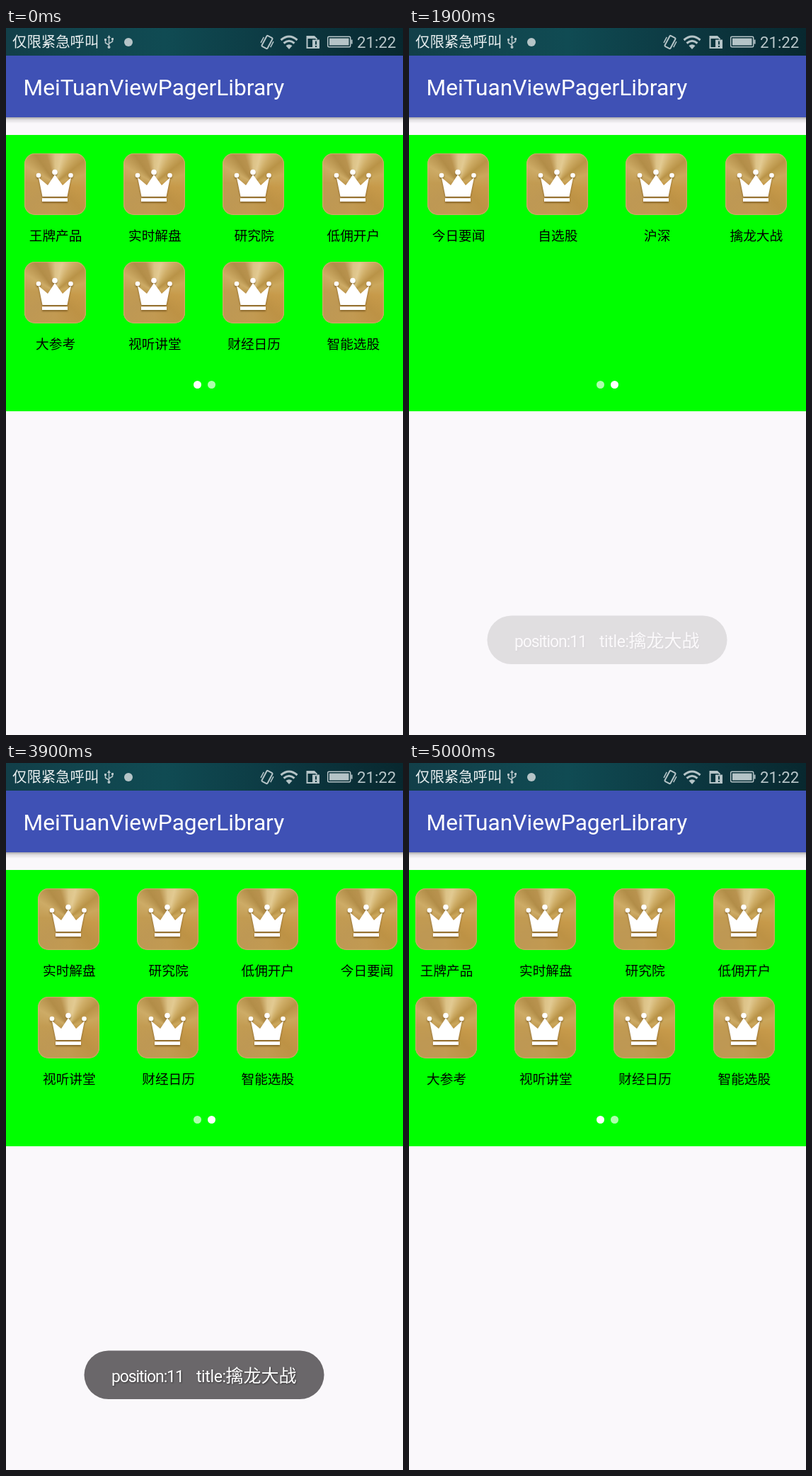
Recreate the animation shown at these times as an HTML page. Size 561 by 998 pixels, loop 5100 ms.

```html
<!DOCTYPE html>
<html lang="zh-CN">
<head>
<meta charset="utf-8">
<style>
html, body { margin: 0; width: 100%; height: 100%; overflow: hidden; background: #faf8fb; }
#stage { position: relative; width: 561px; height: 998px; overflow: hidden; }
#pager { position: absolute; top: 151px; width: 561px; height: 390px; background: #0f0; overflow: hidden; }
#track { position: absolute; inset: 0; will-change: transform; }
.item { position: absolute; width: 140.25px; height: 150px; text-align: center;
  font: 500 18.7px/28px "Noto Sans CJK SC", "Noto Sans CJK", sans-serif; color: #000; white-space: nowrap; }
.icon { position: relative; width: 87px; height: 87px; margin: 0 auto 14px; left: -.7px; border-radius: 15px;
  box-shadow: inset 0 0 1.5px .5px #dcbd7c;
  background: conic-gradient(from 0deg at 50% 48%, #dcc287, #e2ca92 14deg, #cfae68 32deg, #b99347 52deg, #cba75c 74deg,
    #c79a4a 100deg, #bd9245 135deg, #c29a52 180deg, #be9854 230deg, #c29b52 270deg, #cdab66 300deg,
    #b28d48 325deg, #b9934f 343deg, #dcc287); }
.icon svg { width: 87px; height: 87px; display: block; filter: drop-shadow(0 2px 1px #6b4a12a0); }
#overlay { position: absolute; inset: 0; }
.roboto { font-family: Roboto, sans-serif; }
.cjk { font-family: "Noto Sans CJK SC", "Noto Sans CJK", sans-serif; }
#toast text { filter: drop-shadow(1px 1px 1px #0008); }
</style>
</head>
<body>
<div id="stage">
  <div id="pager"><div id="track"></div></div>
  <svg id="overlay" width="561" height="998" viewBox="0 0 561 998">
    <defs>
      <linearGradient id="status">
        <stop stop-color="#123f49"/><stop offset=".4" stop-color="#104b53"/>
        <stop offset=".7" stop-color="#0c3841"/><stop offset="1" stop-color="#08282f"/>
      </linearGradient>
      <linearGradient id="shade" x2="0" y2="1">
        <stop stop-opacity=".32"/><stop offset=".4" stop-opacity=".1"/><stop offset="1" stop-opacity="0"/>
      </linearGradient>
    </defs>
    <rect width="561" height="40" fill="url(#status)"/>
    <rect y="39" width="561" height="87" fill="#3f51b5"/>
    <rect y="126" width="561" height="9" fill="url(#shade)"/>
    <text class="roboto" x="24.5" y="95" font-size="31.7" fill="#fff">MeiTuanViewPagerLibrary</text>
    <text class="cjk" x="9" y="27" font-size="20.4" fill="#e9eff0">仅限紧急呼叫</text>
    <text class="roboto" x="496" y="28" font-size="22.2" fill="#b9c7ca">21:22</text>

    <g fill="none" stroke="#b5c4c7" stroke-width="1.5">
      <!-- usb -->
      <path d="M145.5 13V27M145.5 24L140.5 21V17M145.5 22L150.5 19V16"/>
      <path d="M145.5 10l2.5 4h-5zM139 15h3v3h-3zM149 14h3v3h-3z" fill="#b5c4c7" stroke="none"/>
      <circle cx="145.5" cy="27" r="2" fill="#b5c4c7" stroke="none"/>
      <circle cx="173" cy="20" r="6" fill="#b5c4c7" stroke="none"/>
      <!-- vibrate -->
      <g transform="rotate(28 369 20)">
        <rect x="364.5" y="11.5" width="9" height="17" rx="1.5" stroke-width="2"/>
        <path d="M361.5 16V25M376.5 15V24"/>
      </g>
      <!-- wifi -->
      <path d="M388.5 17Q400 7 411.5 17M392.5 21.5Q400 15 407.5 21.5" stroke-width="3"/>
      <path d="M395.5 25Q400 21.5 404.5 25L400 30z" fill="#b5c4c7" stroke="none"/>
      <!-- sim -->
      <path d="M434 28H425.5V12H435.5L439.5 16" stroke-width="2"/>
      <path d="M425 11h10l3 4h-13zM433 16.5h10v12.5h-10z" fill="#b5c4c7" stroke="none"/>
      <path d="M438 18.5v5M438 25v2" stroke="#123a42" stroke-width="2"/>
      <!-- battery -->
      <rect x="454.7" y="12.2" width="32" height="14.6" rx="1.5"/>
      <path d="M457 14.5h27.5v10H457zM487.5 16.5h2v6h-2z" fill="#b5c4c7" stroke="none"/>
    </g>

    <circle class="dot" cx="270.5" cy="503.5" r="5.5" fill="#fff"/>
    <circle class="dot" cx="290.5" cy="503.5" r="5.5" fill="#fff"/>

    <g id="toast">
      <rect x="110.5" y="829.5" width="339" height="68.5" rx="34.25" fill="#666366"/>
      <text class="roboto" y="874" font-size="23" fill="#fff">
        <tspan x="149" letter-spacing="-1.1">position:11</tspan>
        <tspan x="269" letter-spacing="-.4">title:</tspan>
        <tspan class="cjk" x="310.5" font-size="25">擒龙大战</tspan>
      </text>
    </g>
  </svg>
</div>
<script>
const LOOP = 5100, STEP = 100, WIDTH = 561;
const pages = [
  ["王牌产品", "实时解盘", "研究院", "低佣开户", "大参考", "视听讲堂", "财经日历", "智能选股"],
  ["今日要闻", "自选股", "沪深", "擒龙大战"]
];
// Each swipe: start time, page reached, pixels left at release, settling time
const swipes = [
  [0, 0, 0, 1],
  [700, 1, 430, 455],
  [3000, 0, 380, 340],
  [3900, 1, 440, 542],
  [4800, 0, 309.5, 455]
];
const crown = `<svg viewBox="0 0 87 87" fill="#fff">
  <path d="M20 34L33 45L43 30L54 45L66 34L60.5 61H25.5zM25 63.2H61V68H25z"/>
  <circle cx="20" cy="31" r="3.3"/><circle cx="43" cy="26.5" r="3.8"/><circle cx="65.5" cy="31" r="3.3"/>
</svg>`;

const track = document.getElementById("track");
const toast = document.getElementById("toast");
const dots = document.querySelectorAll(".dot");

track.innerHTML = pages.map((labels, page) => labels.map((label, i) => {
  const x = page * WIDTH + i % 4 * WIDTH / 4;
  const y = 25.5 + (i >> 2) * 153.5;
  return `<div class="item" style="left:${x}px;top:${y}px"><div class="icon">${crown}</div>${label}</div>`;
}).join("")).join("");

const clamp = x => Math.min(1, Math.max(0, x));

function toastOpacity(t) {
  const fadeIn = 1 - (1 - clamp((t - 1850) / 550)) ** 2;
  const fadeOut = 1 - clamp((t - 3800) / 550) ** 2;
  return fadeIn * fadeOut;
}

function draw(now) {
  const t = Math.floor(now % LOOP / STEP) * STEP;
  const [start, page, distance, duration] = swipes.findLast(s => s[0] <= t);
  const left = distance * (1 - clamp((t - start) / duration)) ** 5;
  const offset = page ? WIDTH - left : left;
  track.style.transform = `translateX(${-offset}px)`;
  dots.forEach((dot, i) => dot.setAttribute("opacity", i === page ? 1 : .68));
  toast.setAttribute("opacity", toastOpacity(t));
}

const begin = performance.now();
function tick() {
  draw(performance.now() - begin);
  requestAnimationFrame(tick);
}
tick();
</script>
</body>
</html>
```
